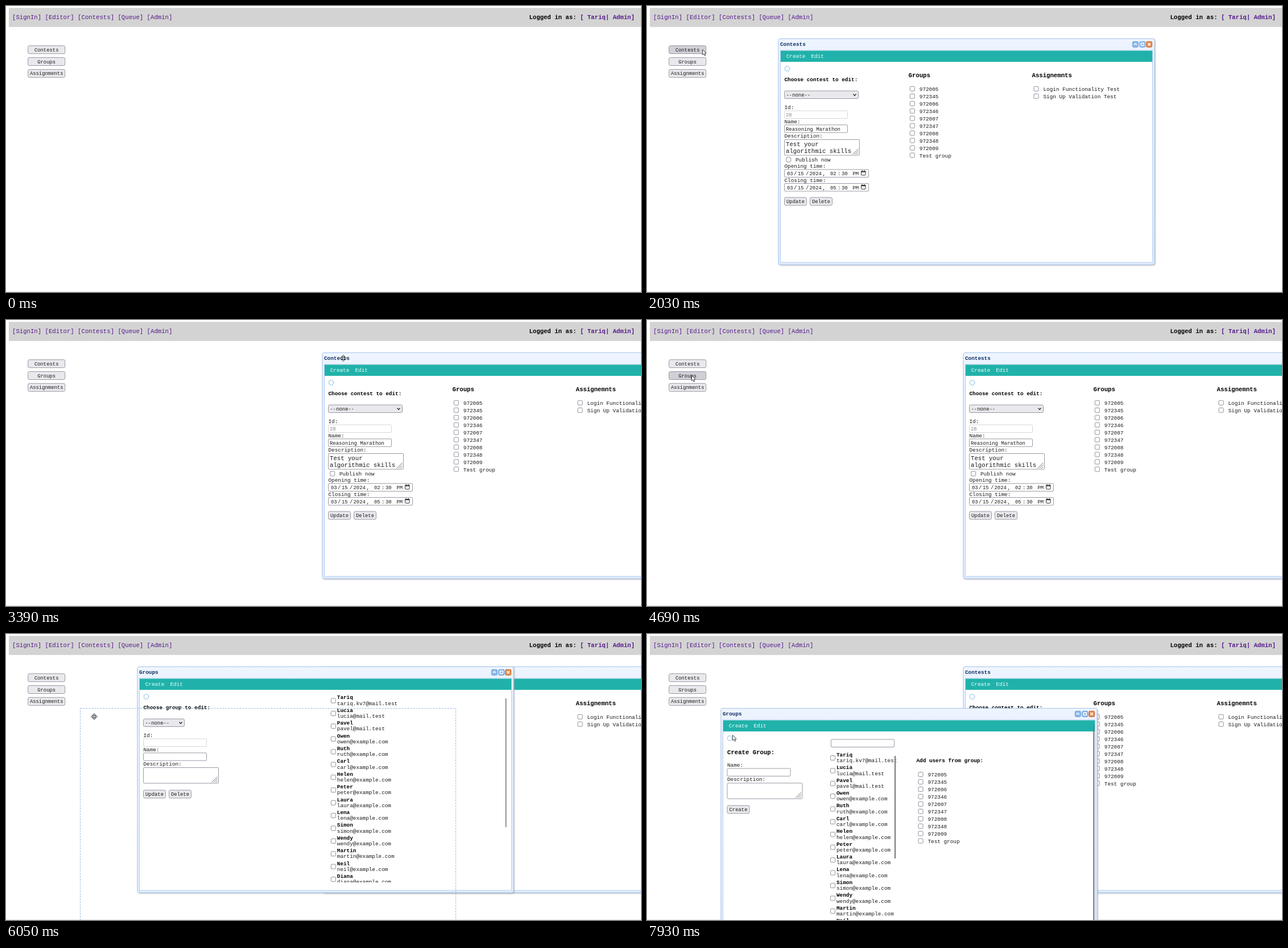
An HTML page that plays this animation: 1116x502 px, repeating every 8 s.

```html
<!DOCTYPE html>
<html lang="en">
<head>
<meta charset="utf-8">
<title>Contest admin</title>
<style>
html, body { margin: 0; width: 100%; height: 100%; overflow: hidden; background: #fff; }
svg { display: block; width: 1116px; height: 502px; }
text { font-family: "Liberation Mono", "Courier New", monospace; font-size: 9.33px; fill: #1c1c1c; white-space: pre; }
.b { font-weight: bold; fill: #000; }
.big { font-size: 10.67px; }
.ui { font-size: 8.89px; }
.link { fill: #551a8b; }
</style>
</head>
<body>
<svg id="stage" viewBox="0 0 1116 502"></svg>
<script>
const LOOP = 8000;
const stage = document.getElementById('stage');

const people = ['Tariq', 'Lucia', 'Pavel', 'Owen', 'Ruth', 'Carl', 'Helen', 'Peter',
  'Laura', 'Lena', 'Simon', 'Wendy', 'Martin', 'Neil', 'Diana'];
const groupNames = ['972005', '972345', '972006', '972346', '972007',
  '972347', '972008', '972348', '972009', 'Test group'];

function mail(name, i) {
  const user = name.toLowerCase();
  if (i === 0) return user + '.kv7@mail.test';
  return user + (i < 3 ? '@mail.test' : '@example.com');
}

// Drawing helpers
const text = (x, y, s, cls = '', extra = '') => `<text x="${x}" y="${y}" class="${cls}" ${extra}>${s}</text>`;
const rect = (x, y, w, h, fill, stroke = 'none', r = 0, extra = '') =>
  `<rect x="${x}" y="${y}" width="${w}" height="${h}" rx="${r}" fill="${fill}" stroke="${stroke}" ${extra}/>`;
const path = (d, stroke, width = 1, fill = 'none') =>
  `<path d="${d}" fill="${fill}" stroke="${stroke}" stroke-width="${width}" stroke-linejoin="round"/>`;

const EDGE = '#8f8f9d', FACE = '#e9e9ed';
const button = (x, y, w, s, id = '') =>
  rect(x, y, w, 14, FACE, EDGE, 2.5, `stroke-width=".9" ${id && `id="${id}"`}`) +
  text(x + w / 2, y + 10, s, 'ui', 'text-anchor="middle"');
const input = (x, y, w, value = '', off = false) =>
  rect(x, y, w, 13.5, '#fff', off ? '#d2d2d8' : EDGE, 1.5, 'stroke-width=".9"') +
  text(x + 2.5, y + 10.3, value, 'ui', off ? 'style="fill:#888"' : '');
const area = (x, y, lines = []) =>
  rect(x, y, 132, 27.5, '#fff', EDGE, 1.5, 'stroke-width=".9"') +
  lines.map((s, i) => text(x + 2.5, y + 11.5 + i * 11.5, s, 'big')).join('') +
  path(`M${x + 120} ${y + 26}l10-10M${x + 123.5} ${y + 26}l6.5-6.5M${x + 127} ${y + 26}l3-3`, '#555', .8);
const check = (x, cy) => rect(x, cy - 4, 8, 8, '#fff', EDGE, 1.3);
const select = (x, y, w) =>
  rect(x, y, w, 13.5, FACE, EDGE, 2.5, 'stroke-width=".9"') + text(x + 3, y + 10, '--none--', 'ui') +
  path(`M${x + w - 9} ${y + 5.5}l2.5 2.8l2.5-2.8`, '#222', 1.2);
const checkList = (x, cy, items) =>
  items.map((s, i) => check(x, cy + i * 12.96) + text(x + 16.5, cy + 3.7 + i * 12.96, s)).join('');
const userList = (x, cy) => people.map((name, i) => {
  const y = cy + i * 22.4;
  return check(x, y) + text(x + 10.5, y - 2.7, name, 'b') + text(x + 10.5, y + 7.6, mail(name, i));
}).join('');

function dateInput(y, hour) {
  const parts = [[246, '03'], [258, '/'], [265, '15'], [279, '/'], [285.5, '2024'], [308.5, ','],
    [322, hour], [335, ':'], [342, '30'], [361.5, 'PM']];
  return input(241.5, y, 148) + parts.map(([x, s]) => text(x, y + 10.3, s, 'ui')).join('') +
    rect(376.5, y + 3, 7.5, 7, 'none', '#333', 1) + path(`M376 ${y + 4}h8.5M378 ${y + 1.5}v2M382.5 ${y + 1.5}v2`, '#333', 1.4);
}

const titleIcon = (x, fill, edge, mark) =>
  rect(x - 5, 62.3, 10, 10, fill, edge, 2) + path(mark, '#fff', 1.4);

function frame(title) {
  return rect(231, 57.5, 661, 396.5, 'url(#chrome)', '#a6c6ee', 3, 'filter="url(#shade)"') +
    rect(234.5, 78, 654, 372, '#fff', '#a3c3ea', 0, 'stroke-width=".8"') +
    text(234, 70, title, 'b', 'style="fill:#0e2d5f"') +
    titleIcon(858.3, '#8db9ea', '#6c9fd8', 'M855.8 68.3l2.5-2.5l2.5 2.5') +
    titleIcon(870.8, '#8db9ea', '#6c9fd8', 'M868.3 65h5v4.5h-5z') +
    titleIcon(882.6, '#e58a4c', '#cc6a35', 'M880.3 65l4.6 4.6m0-4.6l-4.6 4.6') +
    rect(235, 78.5, 653, 19.5, '#20b2aa') +
    text(244.7, 91.2, 'Create', '', 'style="fill:#f0ffff"') + text(288.5, 91.2, 'Edit', '', 'style="fill:#f0ffff"') +
    '<circle cx="246.5" cy="110" r="4.2" fill="none" stroke="#9ccbea" stroke-width="1.5" stroke-dasharray="2.6 .7"/>';
}

const fields = (id, name, lines) =>
  text(241.5, 181.3, 'Id:') + input(241.5, 184, 111, id, true) +
  text(241.5, 206, 'Name:') + input(241.5, 208.7, 111, name) +
  text(241.5, 231, 'Description:') + area(241.5, 234.5, lines);

const contests = frame('Contests') +
  text(241.5, 132, 'Choose contest to edit:', 'b') + select(241.5, 149, 130) +
  fields('28', 'Reasoning Marathon', ['Test your', 'algorithmic skills']) +
  check(244.7, 269.7) + text(261, 273, 'Publish now') +
  text(241.5, 284.3, 'Opening time:') + dateInput(287, '02') +
  text(241.5, 309, 'Closing time:') + dateInput(311.5, '05') +
  button(241.5, 336, 39, 'Update') + button(286.5, 336, 39, 'Delete') +
  text(459.5, 124.7, 'Groups', 'b big') + checkList(462.3, 145.3, groupNames) +
  text(676.5, 124.7, 'Assignemnts', 'b big') +
  checkList(680, 145.3, ['Login Functionality Test', 'Sign Up Validation Test']);

const editPane = text(241.5, 132, 'Choose group to edit:', 'b') + select(241.5, 149, 72) +
  fields('', '', []) + button(241.5, 274, 39, 'Update') + button(286.5, 274, 39, 'Delete') +
  `<g clip-path="url(#listClip)">${userList(571.3, 117)}</g>` + rect(877.8, 113, 1.6, 226, '#777');

const createPane = text(141, 211, 'Create Group:', 'b big') +
  text(141, 233, 'Name:') + input(141, 236, 111) +
  text(141, 258, 'Description:') + area(141, 261.7) + button(141, 301, 39, 'Create') +
  input(323.5, 185, 111) + userList(322.5, 217.5) + rect(435, 214, 2, 180, '#777') +
  text(473.5, 225, 'Add users from group:', 'b') + checkList(477, 246.5, groupNames) +
  rect(784.2, 160, 2, 342, '#777');

const menu = ['Contests', 'Groups', 'Assignments'];
const menuY = i => 69.7 + i * 20.8;

const moveArm = 'M0-5.5l2.3 2.6h-1.4v2h2v-1.4l2.6 2.3l-2.6 2.3v-1.4h-2v2h1.4l-2.3 2.6l-2.3-2.6h1.4v-2h-2v1.4l-2.6-2.3l2.6-2.3v1.4h2v-2h-1.4z';
const cursors = {
  arrow: path('M.5.5v9.3l2.2-2l1.6 3.5l1.6-.7l-1.6-3.4h2.9z', '#333', .9, '#fff'),
  move: path(moveArm, '#222', .9, '#fff'),
  hand: path('M-1 1q1-1.4 2 0v3.4l3 .6q1 .3 1 1.4l-.6 3.2l-1 1.9h-4l-2.3-3.3q-.7-1.3.6-1.4l1.3 1.2z', '#222', .9, '#fff')
};

stage.innerHTML = `<defs>
  <linearGradient id="chrome" x1="0" y1="0" x2="0" y2="1">
    <stop offset="0" stop-color="#eff5ff"/><stop offset=".06" stop-color="#eaf2ff"/><stop offset="1" stop-color="#e3edff"/>
  </linearGradient>
  <filter id="shade" x="-2%" y="-2%" width="104%" height="104%">
    <feDropShadow dx="1" dy="1" stdDeviation="1.2" flood-color="#999" flood-opacity=".7"/>
  </filter>
  <clipPath id="listClip"><rect x="560" y="104" width="320" height="332"/></clipPath></defs>` +
  rect(0, 0, 1116, 502, '#fff') + rect(0, 501, 1116, 1, '#e6e6e6') + rect(5, 3.3, 1111, 33.5, '#d3d3d3') +
  text(11, 23.3, '[SignIn] [Editor] [Contests] [Queue] [Admin]', 'big link') +
  text(919.4, 23.3, `Logged in as: <tspan class="link">[ ${people[0]}| Admin]</tspan>`, 'b big') +
  menu.map((s, i) => button(38.7, menuY(i), 65, s, 'menu' + i)).join('') +
  `<g id="contests">${contests}</g>
  <g id="groups">${frame('Groups')}<g id="edit">${editPane}</g>
  <g id="create" transform="translate(101 -73)">${createPane}</g></g>` +
  rect(231.5, 57.5, 660, 396, 'none', '#99bbe8', 0, 'id="proxy" stroke-dasharray="3 2"') +
  '<g id="cursor">' + Object.keys(cursors).map(k => `<g id="${k}">${cursors[k]}</g>`).join('') + '</g>';

const el = id => document.getElementById(id);
const show = (id, on) => el(id).setAttribute('display', on ? 'inline' : 'none');
const place = (id, x, y) => el(id).setAttribute('transform', `translate(${x.toFixed(2)} ${y.toFixed(2)})`);

// Bursts of screen updates: start, end, number of updates
const bursts = [[250, 1000, 12], [1200, 1960, 11], [2030, 2640, 10], [2830, 3240, 7], [3390, 3460, 2],
  [3660, 4420, 12], [4490, 5240, 11], [5300, 6050, 12], [6120, 6610, 8], [6870, 7660, 12], [7720, 7930, 4]];

function snap(t) {
  let out = 0;
  for (const [a, b, n] of bursts) {
    if (t < a) break;
    const step = (b - a) / (n - 1);
    out = Math.min(b, a + Math.floor((t - a) / step + 1e-6) * step);
  }
  return out;
}

// Pointer route: time, x, y
const route = [[250, 1031, 489], [1000, 72, 152], [1200, 72, 122], [1560, 84, 82], [1960, 97, 76], [2030, 97, 76],
  [2640, 269, 67], [2830, 272, 67], [3240, 594, 67], [3660, 590, 67], [4260, 150, 121], [4420, 117, 108],
  [4490, 98, 100], [4640, 78, 97], [4870, 78, 97], [5240, 254, 71], [5370, 256, 72], [5440, 252, 73],
  [6050, 155, 145], [6120, 155, 145], [6610, 191, 163], [6870, 188, 162], [7230, 162, 160],
  [7450, 160, 161], [7660, 160, 168], [7720, 157, 170], [7930, 150, 177]];

function pointer(t) {
  const i = route.findIndex(k => k[0] > t);
  if (i === 0) return [-50, -50];
  if (i < 0) return route[route.length - 1].slice(1);
  const [a, x0, y0] = route[i - 1], [b, x1, y1] = route[i];
  const u = (t - a) / (b - a), e = u * u * (3 - 2 * u);
  return [x0 + (x1 - x0) * e, y0 + (y1 - y0) * e];
}

const inside = ([x, y], l, t, r, b) => x >= l && x <= r && y >= t && y <= b;

function draw(ms) {
  const t = snap(ms), p = pointer(t), seen = pointer(t - 70);
  const groupsOpen = t >= 4900, creating = t >= 7300;
  const contestX = t >= 3390 ? 325 : 0;
  const [gx, gy] = t >= 6120 ? [-101, 73] : [0, 0];

  menu.forEach((s, i) => {
    const y = menuY(i), hot = inside(seen, 38, y, 104, y + 14.5);
    const pressed = hot && (t > 1820 && t < 1960 || t > 4700 && t < 4860);
    el('menu' + i).setAttribute('fill', pressed ? '#b1b1b9' : hot ? '#d0d0d7' : FACE);
  });

  show('contests', t >= 2030);
  place('contests', contestX, 0);
  show('groups', groupsOpen);
  place('groups', gx, gy);
  show('edit', !creating);
  show('create', creating);

  const dragA = t >= 2830 && t < 3390, dragB = t >= 5430 && t < 6120;
  show('proxy', dragA || dragB);
  if (dragA) place('proxy', p[0] - 269, 0);
  if (dragB) place('proxy', p[0] - 256, p[1] - 72);

  const wx = groupsOpen ? gx : contestX;
  const q = [p[0] - wx, p[1] - gy];
  let kind = 'arrow';
  if (dragA || dragB || t >= 2030 && inside(q, 231, 57, 850, 78)) kind = 'move';
  else if (t >= 2030 && (inside(q, 241, 79, 280, 98) || inside(q, 285, 79, 313, 98))) kind = 'hand';
  Object.keys(cursors).forEach(k => show(k, k === kind));
  place('cursor', p[0], p[1]);
}

const start = performance.now();
function tick() {
  draw((performance.now() - start) % LOOP);
  requestAnimationFrame(tick);
}
tick();
</script>
</body>
</html>
```
